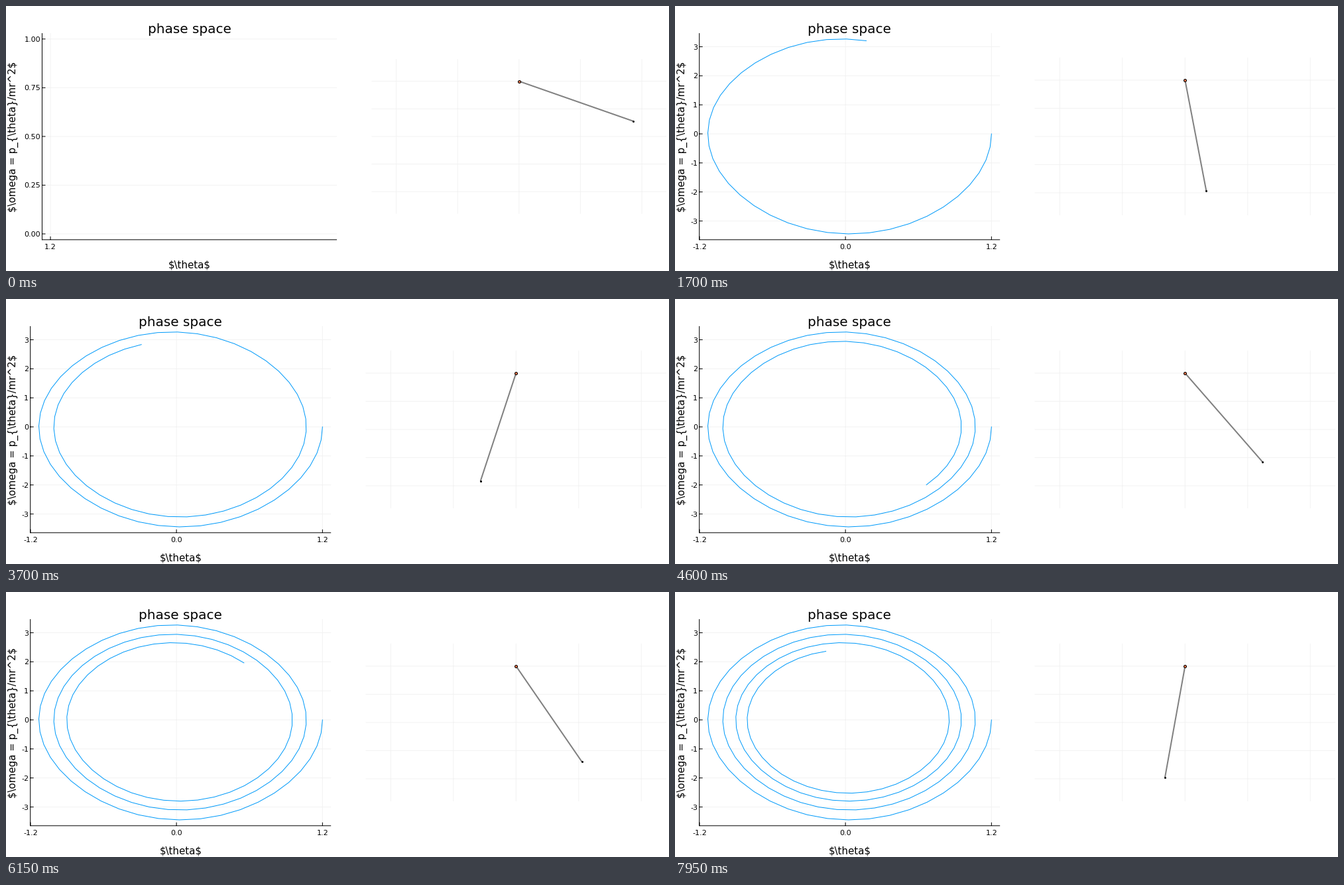
A matplotlib script for the animation above (8 s loop, 1000 by 400 pixels).

```python
import math

import numpy as np
import matplotlib.pyplot as plt
from matplotlib.animation import FuncAnimation

WIDTH, HEIGHT, DPI = 1000, 400, 100
PX = 72 / DPI  # points per pixel
FRAMES, INTERVAL = 160, 50

GRAVITY, DAMPING, THETA0 = 9.8, 0.1, 1.2
TOP, BOTTOM = 41.0, 352.8
RIGHT_EDGE = 996.06
BLUE, CORAL, GRAY = "#009afa", "#e26f46", "#808080"

plt.rcParams["font.family"] = "DejaVu Sans"


def slope(state):
    theta, omega = state
    return np.array([omega, -GRAVITY * math.sin(theta) - DAMPING * omega])


def swing(count, dt=INTERVAL / 1000, substeps=8):
    """Damped pendulum released at rest, sampled every dt (RK4)."""
    h = dt / substeps
    state = np.array([THETA0, 0.0])
    path = [state]
    for _ in range(count - 1):
        for _ in range(substeps):
            k1 = slope(state)
            k2 = slope(state + h / 2 * k1)
            k3 = slope(state + h / 2 * k2)
            k4 = slope(state + h * k3)
            state = state + h / 6 * (k1 + 2 * k2 + 2 * k3 + k4)
        path.append(state)
    return np.array(path)


def limits(values):
    """Data range widened by 3 % on both sides."""
    lo, hi = values.min(), values.max()
    if hi == lo:
        hi = lo + 1
    pad = 0.03 * (hi - lo)
    return lo - pad, hi + pad


def nice_ticks(lo, hi):
    """Tick values and labels with the best mix of count, coverage and niceness."""
    best = None
    for z in range(-3, 2):
        for q, niceness in ((1, 1.0), (5, 0.9), (2, 0.7), (2.5, 0.5), (3, 0.2)):
            step = q * 10.0 ** z
            first = math.ceil(lo / step - 1e-9)
            last = math.floor(hi / step + 1e-9)
            count = last - first + 1
            if not 4 <= count <= 8:
                continue
            coverage = 1.5 * (hi - lo) / ((count - 1) * step)
            score = (1 - abs(count - 5) / 5) / 4 + coverage / 3 + niceness / 4
            rank = (round(score, 6), -count)
            if best is None or rank > best[0]:
                best = rank, step, range(first, last + 1)
    _, step, steps = best
    places = next(d for d in range(5)
                  if abs(step * 10 ** d - round(step * 10 ** d)) < 1e-6)
    values = [k * step for k in steps]
    return values, [f"{v:.{places}f}" for v in values]


def set_segments(line, segments):
    """Show separate straight segments (x0, y0, x1, y1) in one line artist."""
    xs, ys = [], []
    for x0, y0, x1, y1 in segments:
        xs += [x0, x1, np.nan]
        ys += [y0, y1, np.nan]
    line.set_data(xs, ys)


fig = plt.figure(figsize=(WIDTH / DPI, HEIGHT / DPI), dpi=DPI, facecolor="white")
ax = fig.add_axes([0, 0, 1, 1])
ax.set_xlim(0, WIDTH)
ax.set_ylim(HEIGHT, 0)
ax.axis("off")


def add_line(color, width, **kw):
    return ax.plot([], [], color=color, lw=width * PX, snap=False, **kw)[0]


def add_text(text, x, y, size, ha="center", **kw):
    return ax.text(x, y, text, fontsize=size * PX, ha=ha, va="baseline",
                   color="black", parse_math=False, **kw)


grid = add_line("black", 1, alpha=0.05, solid_capstyle="butt")
axes_lines = add_line("black", 1, solid_capstyle="butt")
curve = add_line(BLUE, 1, solid_joinstyle="round")
rod = add_line(GRAY, 2, solid_capstyle="butt")
pivot = add_line("black", 1, marker="o", ms=4 * PX, mfc=CORAL,
                 mec="black", mew=1 * PX)
bob = add_line("black", 1, marker="o", ms=3 * PX, mew=0)

title = add_text("phase space", 0, 41, 20)
x_label = add_text(r"$\theta$", 0, 396, 15)
y_label = add_text(r"$\omega = p_{\theta}/mr^2$", 14.3, 196.9, 15,
                   rotation=90, rotation_mode="anchor")
x_texts = [add_text(f"{v:.1f}", 0, 367, 11.1) for v in (-THETA0, 0, THETA0)]
y_texts = [add_text("", 0, 0, 11.1, ha="right") for _ in range(8)]

path = swing(FRAMES)


def draw(frame):
    theta, omega = path[:frame + 1].T
    x_lo, x_hi = limits(theta)
    y_lo, y_hi = limits(omega)
    y_values, y_names = nice_ticks(y_lo, y_hi)

    # The left margin follows the longest tick label.
    left = 18.9 + 8.889 * max(map(len, y_names))
    width = (943.7 - left) / 2
    right = left + width

    def to_x(v):
        return left + width * (v - x_lo) / (x_hi - x_lo)

    def to_y(v):
        return BOTTOM - (BOTTOM - TOP) * (v - y_lo) / (y_hi - y_lo)

    grid_parts = []
    axis_parts = [(left, TOP, left, BOTTOM + 0.5), (left, BOTTOM, right, BOTTOM)]

    for v, text in zip((-THETA0, 0, THETA0), x_texts):
        shown = x_lo <= v <= x_hi
        text.set_visible(shown)
        if shown:
            x = to_x(v)
            text.set_x(x)
            grid_parts.append((x, TOP, x, BOTTOM))
            axis_parts.append((x, BOTTOM, x, BOTTOM - 5))

    for text in y_texts:
        text.set_text("")
    for v, name, text in zip(y_values, y_names, y_texts):
        y = to_y(v)
        text.set_text(name)
        text.set_position((left - 2.4, y + 4))
        grid_parts.append((left, y, right, y))
        axis_parts.append((left, y, left + 5, y))

    title.set_x((left + right) / 2)
    x_label.set_x((left + right) / 2)
    curve.set_data(to_x(theta), to_y(omega))

    # Pendulum panel: x from -1.2 to 1.2, y from -1.2 to 0.2.
    sx = width / 2.4
    sy = 0.9 * sx
    cx = RIGHT_EDGE - width / 2
    cy = (TOP + BOTTOM) / 2 - 0.5 * sy
    for i in range(5):
        gx = cx + (i - 2) * 0.5 * sx
        gy = cy + i * 0.25 * sy
        grid_parts.append((gx, cy - 0.2 * sy, gx, cy + 1.2 * sy))
        grid_parts.append((RIGHT_EDGE - width, gy, RIGHT_EDGE, gy))

    bx = cx + sx * math.sin(theta[-1])
    by = cy + sy * math.cos(theta[-1])
    rod.set_data([cx, bx], [cy, by])
    pivot.set_data([cx], [cy])
    bob.set_data([bx], [by])

    set_segments(grid, grid_parts)
    set_segments(axes_lines, axis_parts)
    return []


anim = FuncAnimation(fig, draw, frames=FRAMES, interval=INTERVAL,
                     repeat=True, repeat_delay=0, blit=False)
plt.show()
```
